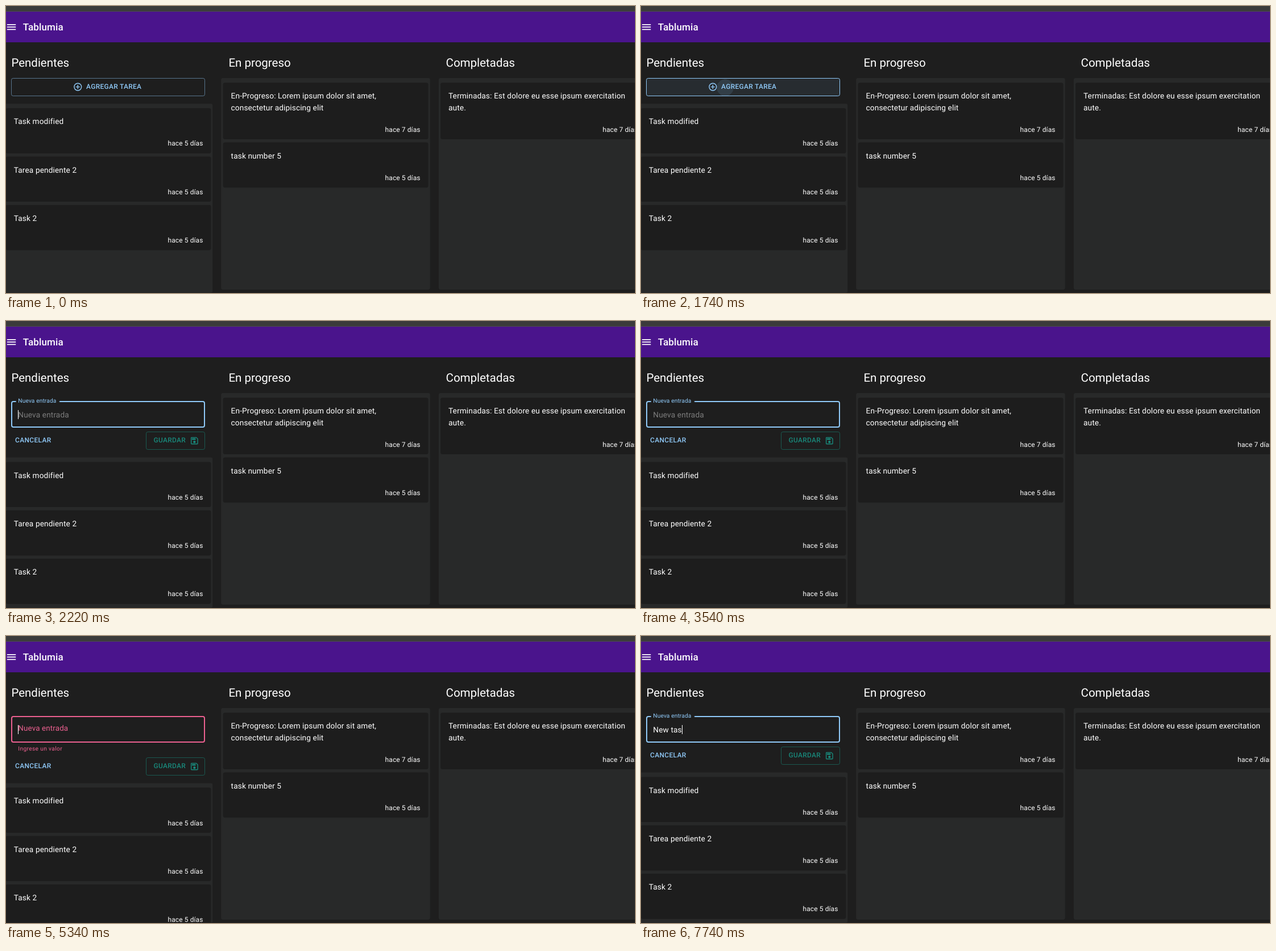
Recreate the animation shown at these times as an HTML page. Size 1106 px wide and 506 px high, loop 8 s.

```html
<!DOCTYPE html>
<html lang="es">
<head>
<meta charset="utf-8">
<title>Tablero de tareas</title>
<style>
:root { --page: #1e1e1e; --column: #282929; --card: #1d1d1d; --blue: #90caf9; --pink: #ec6090; --teal: #19897b; }
html, body { margin: 0; width: 100%; height: 100%; overflow: hidden; background: var(--page); }
svg { display: block; width: 1106px; height: 506px; }

text { font: 400 13.65px Roboto, sans-serif; letter-spacing: .00938em; fill: #fff; text-rendering: geometricPrecision; }
.brand { font-size: 17.07px; font-weight: 500; letter-spacing: .0075em; }
.head { font-size: 20.48px; letter-spacing: 0; }
.age { font-size: 11.95px; letter-spacing: .01071em; text-anchor: end; }
.btn { font-size: 11.95px; font-weight: 500; letter-spacing: .02857em; fill: var(--blue); }
.helper { font-size: 10.24px; letter-spacing: .03333em; fill: var(--pink); }

.column { fill: var(--column); rx: 3.4px; }
.card rect { width: 361px; height: 79.6px; rx: 3.4px; fill: var(--card); }
.card.tall rect { height: 99.8px; }

/* One shared 8 s clock; segments are hard cuts unless a keyframe sets its own easing. */
.idle, .form, .list, .add, .ripple, .outline, .notch, .label, .hint, .typing, .caret, .helper, .actions {
  animation: 8s step-end infinite;
}
.idle { animation-name: idle; }
.form { animation-name: form; }
.list { animation-name: list; }
.add { animation-name: add; fill: #90caf900; stroke: #90caf980; }
.ripple { animation-name: ripple; fill: var(--blue); transform: scale(0); }
.outline { animation-name: outline; fill: none; stroke: var(--blue); stroke-width: 2; x: 10px; y: 142px; width: 339px; height: 45px; rx: 3px; }
.notch { animation-name: notch; fill: var(--page); }
.label { animation-name: label; }
.hint { animation-name: hint; }
.typing { animation-name: typing; }
.caret { animation-name: caret; fill: #fff; }
.helper { animation-name: helper; }
.actions { animation-name: actions; }

@keyframes idle { 0% { visibility: visible } 25.25%, 100% { visibility: hidden } }
@keyframes form { 0% { visibility: hidden } 25.25%, 100% { visibility: visible } }
@keyframes list {
  0% { transform: none }
  25.25% { transform: translateY(68.3px) }
  51.25% { transform: translateY(87.1px) }
  79.25%, 100% { transform: translateY(68.3px) }
}
@keyframes add {
  0% { fill: #90caf900; stroke: #90caf980 }
  16.375% { fill: #90caf900; stroke: #90caf980; animation-timing-function: cubic-bezier(.4, 0, .2, 1) }
  19.5%, 100% { fill: #90caf914; stroke: #90caf9 }
}
@keyframes ripple {
  0% { transform: scale(0); opacity: .1 }
  20.69% { transform: scale(0); opacity: .1; animation-timing-function: cubic-bezier(.4, 0, .2, 1) }
  27.56%, 100% { transform: scale(1); opacity: .3 }
}
@keyframes outline {
  0% { stroke: var(--blue); stroke-width: 2; x: 10px; y: 142px; width: 339px; height: 45px }
  51.25% { stroke: var(--pink); stroke-width: 1; x: 9.5px; y: 141.5px; width: 340px; height: 46px }
  66.72% { stroke: var(--pink); stroke-width: 2; x: 10px; y: 142px; width: 339px; height: 45px }
  79.25%, 100% { stroke: var(--blue); stroke-width: 2; x: 10px; y: 142px; width: 339px; height: 45px }
}
@keyframes notch {
  0% { transform: scaleX(0) }
  25.875% { transform: scaleX(0); animation-timing-function: ease-out }
  27.125% { transform: scaleX(1) }
  51.25% { transform: scaleX(1); animation-timing-function: ease-out }
  51.875% { transform: scaleX(0) }
  67.35% { transform: scaleX(0); animation-timing-function: ease-out }
  68.6%, 100% { transform: scaleX(1) }
}
@keyframes label {
  0% { transform: translate(21.3px, 168.8px) scale(1); fill: #bcbcbc }
  25.25% { transform: translate(21.3px, 168.8px) scale(1); fill: #bcbcbc; animation-timing-function: cubic-bezier(0, 0, .2, 1) }
  27.75% { transform: translate(21.3px, 144.2px) scale(.75); fill: var(--blue) }
  51.25% { transform: translate(21.3px, 144.2px) scale(.75); fill: var(--blue); animation-timing-function: cubic-bezier(0, 0, .2, 1) }
  53.75% { transform: translate(21.3px, 168.8px) scale(1); fill: var(--pink) }
  66.72% { transform: translate(21.3px, 168.8px) scale(1); fill: var(--pink); animation-timing-function: cubic-bezier(0, 0, .2, 1) }
  69.22% { transform: translate(21.3px, 144.2px) scale(.75); fill: var(--pink) }
  79.25% { transform: translate(21.3px, 144.2px) scale(.75); fill: var(--pink); animation-timing-function: cubic-bezier(0, 0, .2, 1) }
  81.75%, 100% { transform: translate(21.3px, 144.2px) scale(.75); fill: var(--blue) }
}
@keyframes hint {
  0% { opacity: 0 }
  25.25% { opacity: 0; animation-timing-function: ease-in-out }
  27.75% { opacity: .42 }
  51.25% { opacity: .42; animation-timing-function: ease-in-out }
  53.75% { opacity: 0 }
  66.72% { opacity: 0; animation-timing-function: ease-in-out }
  69.22% { opacity: .42 }
  79.25%, 100% { opacity: 0 }
}
@keyframes typing {
  0% { transform: none }
  79.25% { transform: translateX(10px) }
  83.125% { transform: translateX(17.4px) }
  84.625% { transform: translateX(28px) }
  86.875% { transform: translateX(31px) }
  89.125% { transform: translateX(35.5px) }
  94.375% { transform: translateX(43.3px) }
  96.625%, 100% { transform: translateX(51px) }
}
@keyframes caret {
  0% { opacity: 1 }
  31.375% { opacity: 0 }
  37.375% { opacity: 1 }
  44.125% { opacity: 0 }
  50.125% { opacity: 1 }
  51.25% { opacity: 0 }
  66.72% { opacity: 1 }
  73.375% { opacity: 0 }
  79.25%, 100% { opacity: 1 }
}
@keyframes helper { 0% { opacity: 0 } 51.25% { opacity: 1 } 79.25%, 100% { opacity: 0 } }
@keyframes actions { 0% { transform: none } 51.25% { transform: translateY(19px) } 79.25%, 100% { transform: none } }
</style>
</head>
<body>
<svg viewBox="0 0 1106 506">
  <defs>
    <clipPath id="listClip"><rect x="-4" y="160" width="367.5" height="345.5" rx="3.4"/></clipPath>
    <clipPath id="addClip"><rect x="9" y="127" width="341" height="32" rx="3.4"/></clipPath>
  </defs>

  <!-- app bar -->
  <rect width="1106" height="10" fill="#3b3b3b"/>
  <rect y="9" width="1106" height="1" fill="#4c4a4e"/>
  <rect y="10" width="1106" height="54" fill="#4a148c"/>
  <path d="M3 18h18v-2H3zM3 13h18v-2H3zM3 8h18V6H3z" fill="#fff" transform="translate(-.7 26.8) scale(.8533)"/>
  <text class="brand" x="29.8" y="42.8">Tablumia</text>

  <text class="head" x="9.4" y="107">Pendientes</text>
  <text class="head" x="391.4" y="107">En progreso</text>
  <text class="head" x="773.6" y="107">Completadas</text>

  <!-- pending -->
  <g clip-path="url(#listClip)">
    <g class="list">
      <rect class="column" x="-4" y="172.3" width="367.5" height="400"/>
      <g class="card" transform="translate(-.5 180.2)">
        <rect/><text x="14.3" y="28.1">Task modified</text><text class="age" x="347" y="66.3">hace 5 días</text>
      </g>
      <g class="card" transform="translate(-.5 265.5)">
        <rect/><text x="14.3" y="28.1">Tarea pendiente 2</text><text class="age" x="347" y="66.3">hace 5 días</text>
      </g>
      <g class="card" transform="translate(-.5 350.8)">
        <rect/><text x="14.3" y="28.1">Task 2</text><text class="age" x="347" y="66.3">hace 5 días</text>
      </g>
    </g>
  </g>

  <!-- in progress -->
  <rect class="column" x="378.2" y="127" width="367.5" height="373"/>
  <g class="card tall" transform="translate(381.6 135.2)">
    <rect/>
    <text x="14" y="28.1">En-Progreso: Lorem ipsum dolor sit amet,</text>
    <text x="14" y="48.6">consectetur adipiscing elit</text>
    <text class="age" x="347" y="86.5">hace 7 días</text>
  </g>
  <g class="card" transform="translate(381.6 240.6)">
    <rect/><text x="14" y="28.1">task number 5</text><text class="age" x="347" y="66.3">hace 5 días</text>
  </g>

  <!-- completed -->
  <rect class="column" x="760.8" y="127" width="367.5" height="373"/>
  <g class="card tall" transform="translate(764 135.2)">
    <rect/>
    <text x="14" y="28.1">Terminadas: Est dolore eu esse ipsum exercitation</text>
    <text x="14" y="48.6">aute.</text>
    <text class="age" x="347" y="86.5">hace 7 días</text>
  </g>

  <!-- add button -->
  <g class="idle">
    <rect class="add" x="9.5" y="127.5" width="340" height="31" rx="3"/>
    <g clip-path="url(#addClip)">
      <g transform="translate(148 144)"><circle class="ripple" r="203"/></g>
    </g>
    <g fill="none" stroke="#90caf9" stroke-width="1.42">
      <circle cx="126.3" cy="142.6" r="6.4"/>
      <path d="M122.75 142.6h7.1M126.3 139.05v7.1"/>
    </g>
    <text class="btn" x="141" y="146.3">AGREGAR TAREA</text>
  </g>

  <!-- entry form -->
  <g class="form">
    <rect class="outline"/>
    <g transform="translate(17.6 0)"><rect class="notch" y="140" width="76.4" height="4"/></g>
    <text x="21.3" y="169.7">New tas</text>
    <g class="typing">
      <rect x="21" y="155" width="62" height="20" fill="#1e1e1e"/>
      <rect class="caret" x="21" y="157" width="1" height="16"/>
    </g>
    <text class="hint" x="21.3" y="169.7">Nueva entrada</text>
    <text class="label">Nueva entrada</text>
    <text class="helper" x="21.3" y="202.2">Ingrese un valor</text>
    <g class="actions">
      <text class="btn" x="16" y="214.4">CANCELAR</text>
      <rect x="246.5" y="195.5" width="103" height="31" rx="3" fill="none" stroke="#19897b" stroke-opacity=".55"/>
      <text class="btn" x="259.5" y="214.4" style="fill: var(--teal)">GUARDAR</text>
      <path transform="translate(322.8 202.5) scale(.711)" fill="#19897b" d="M17 3H5c-1.11 0-2 .9-2 2v14c0 1.1.89 2 2 2h14c1.1 0 2-.9 2-2V7l-4-4zm2 16H5V5h11.17L19 7.83V19zm-7-7c-1.66 0-3 1.34-3 3s1.34 3 3 3 3-1.34 3-3-1.34-3-3-3zM6 6h9v4H6z"/>
    </g>
  </g>
</svg>
</body>
</html>
```
